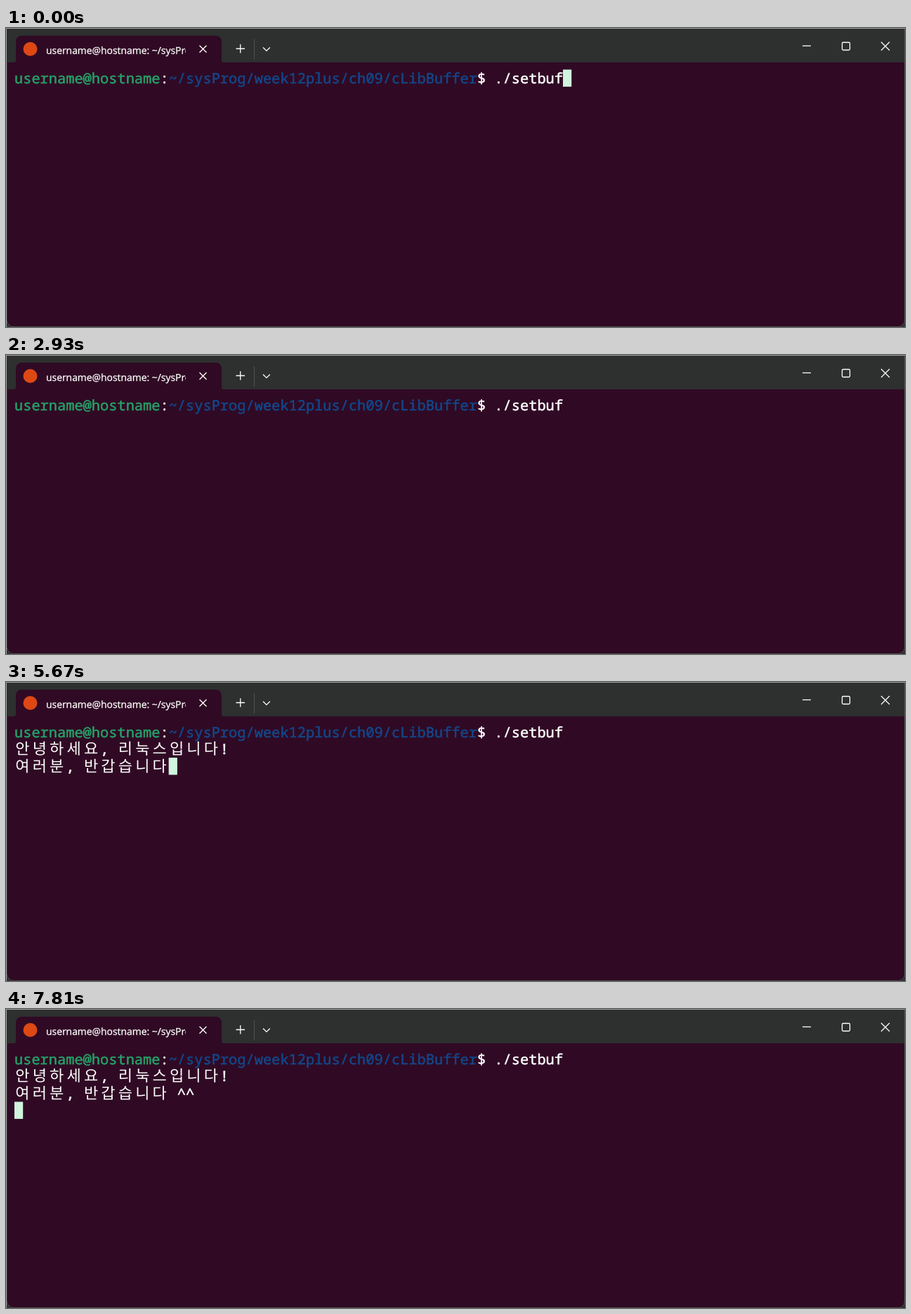
An HTML page for the animation above (8000 ms loop, 1280x427 px).

```html
<!DOCTYPE html>
<html lang="ko">
<head>
<meta charset="utf-8">
<title>Terminal</title>
<style>
  html, body { margin: 0; width: 100%; height: 100%; overflow: hidden; background: #2d302f; }
  svg { display: block; width: 1280px; height: 427px; }
  text { color: #fff; fill: currentColor; stroke: currentColor; text-rendering: geometricPrecision; }
  .mono { font: 400 20.34px "Noto Sans Mono", "DejaVu Sans Mono", monospace; stroke-width: 0.5px; }
  .hangul { font: 400 22px "Noto Sans CJK KR", "Noto Sans CJK", sans-serif; stroke-width: 0; }
  .tab { font: 400 13.9px "Open Sans", "Noto Sans", sans-serif; stroke-width: 0.3px; }
  .icon { fill: none; stroke: #fff; stroke-width: 1.3; }
</style>
</head>
<body>
<svg viewBox="0 0 1280 427" xmlns="http://www.w3.org/2000/svg">
  <defs>
    <clipPath id="tabClip"><rect x="50" y="15" width="206" height="32"/></clipPath>
  </defs>

  <!-- window frame and terminal body -->
  <rect width="1280" height="427" fill="#2d302f"/>
  <path d="M2 49H1279V418a8 8 0 0 1 -8 8H10a8 8 0 0 1 -8 -8Z" fill="#300a24"/>
  <path d="M1.5 418a8.5 8.5 0 0 0 8.5 8.5H1271a8.5 8.5 0 0 0 8.5 -8.5V0" fill="none" stroke="#4a4d4c"/>
  <path d="M0.5 427V0.5H1280" fill="none" stroke="#a0a3a2"/>

  <!-- tab -->
  <path d="M10 49.5q4 0 4 -4V19a8 8 0 0 1 8 -8H299a8 8 0 0 1 8 8V45.5q0 4 4 4Z" fill="#300a24"/>
  <circle cx="34.5" cy="30" r="10" fill="#dd4814"/>
  <text class="tab" x="57" y="36.5" clip-path="url(#tabClip)">username@hostname: ~/sysProg</text>
  <path class="icon" d="M275.500 25l10 10m0 -10l-10 10"/>

  <!-- title bar buttons -->
  <path class="icon" d="M327.5 29.5h12.5m-6.25 -6.25v12.5"/>
  <path d="M353.5 16V45" stroke="#505352"/>
  <path class="icon" d="M366 27.700l4.9 4.9l4.9 -4.9"/>
  <path class="icon" d="M1134 25.5h12"/>
  <rect class="icon" x="1190.5" y="20.5" width="11" height="11" rx="1.5"/>
  <path class="icon" d="M1246 20l12 12m0 -12l-12 12"/>

  <g id="output"></g>
  <rect id="cursor" width="12.2" height="24.4" fill="#cff5de"/>
</svg>
<script>
const LOOP = 8000, LEFT = 12, CELL = 12.203, LINE = 24.37, TOP = 59.4, BASE = 79;
const ENTER = 1190, BLINK = 547;
const GREEN = "#26a269", BLUE = "#12488b", WHITE = "#fff";
const output = document.getElementById("output");
const cursor = document.getElementById("cursor");
const pen = { row: 0, col: 0 };

// Writes one run on the character grid; a Hangul syllable takes two cells.
function writeRun(group, run, color) {
  const wide = /[가-힣]/.test(run);
  const step = wide ? 2 : 1;
  if (run.trim()) {
    const text = document.createElementNS(output.namespaceURI, "text");
    const xs = [...run].map((_, i) => LEFT + (pen.col + i * step) * CELL + (wide ? 1.3 : 0));
    text.setAttribute("class", wide ? "hangul" : "mono");
    text.setAttribute("x", xs.join(" "));
    text.setAttribute("y", BASE + pen.row * LINE);
    text.style.color = color;
    text.textContent = run;
    group.append(text);
  }
  pen.col += run.length * step;
}

// Prints a string that appears at the given time and notes where the cursor ends up.
function print(time, string, color = WHITE) {
  const group = document.createElementNS(output.namespaceURI, "g");
  for (const run of string.match(/\n|[가-힣]+|[^가-힣\s]+| +/g)) {
    if (run === "\n") {
      pen.row++;
      pen.col = 0;
    } else {
      writeRun(group, run, color);
    }
  }
  output.append(group);
  return { time, group, ...pen };
}

const prints = [
  print(0, "username@hostname", GREEN),
  print(0, ":"),
  print(0, "~/sysProg/week12plus/ch09/cLibBuffer", BLUE),
  print(0, "$ ./setbuf"),
  print(ENTER, "\n"),
  print(3190, "안녕하세요, 리눅스입니다!\n"),
  print(4140, "여러분, "),
  print(5140, "반갑습니다"),
  print(6150, " ^^"),
  print(7150, "\n"),
];

// Enter restarts the blink; fresh output keeps the cursor lit until the next beat.
function isLit(time, lastPrint) {
  const firstOff = time < ENTER ? 400 : ENTER + 600;
  const beat = t => Math.floor((t - firstOff) / BLINK);
  return beat(time) % 2 !== 0 || beat(time) === beat(lastPrint);
}

function show(time) {
  const last = prints.findLast(p => p.time <= time);
  for (const p of prints) p.group.style.visibility = p.time <= time ? "visible" : "hidden";
  cursor.setAttribute("x", LEFT + last.col * CELL);
  cursor.setAttribute("y", TOP + last.row * LINE);
  cursor.style.visibility = isLit(time, last.time) ? "visible" : "hidden";
}

const start = performance.now();
function tick() {
  show((performance.now() - start) % LOOP);
  requestAnimationFrame(tick);
}
tick();
</script>
</body>
</html>
```
